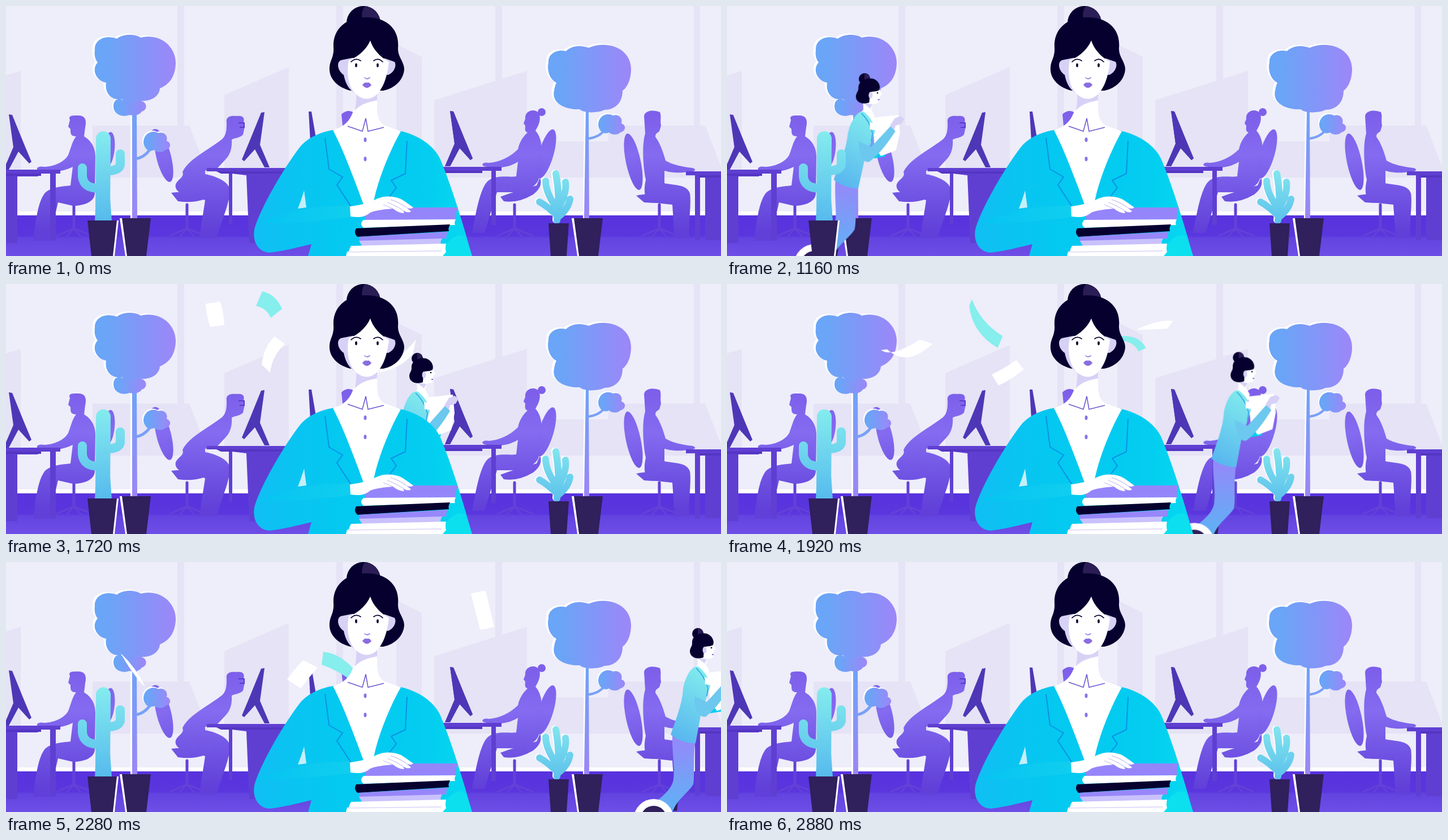
Recreate the animation shown at these times as an HTML page. Size 1264 by 443 pixels, loop 4040 ms.

```html
<!DOCTYPE html>
<html lang="en">
<head>
<meta charset="utf-8">
<title>Office</title>
<style>
html, body { margin: 0; width: 100%; height: 100%; overflow: hidden; background: #eeedfa; }
svg { display: block; width: 100vw; height: 100vh; }

/* motion advances in 40 ms steps */
.walker, .sheet { animation: 4040ms linear infinite; }
.walker { animation-name: ride; transform-origin: 0 155px; }
.sheet { fill: #fff; }
.mint { fill: #86eeec; }
#a { animation-name: a; }
#b { animation-name: b; }
#c { animation-name: c; }
#d { animation-name: d; }
#e { animation-name: e; }

@keyframes ride {
  0% { transform: translate(-1300px, 0) skewX(-2deg); animation-timing-function: step-end; }
  19.801% { transform: translate(-1105px, 1px) skewX(-2deg); animation-timing-function: steps(9); }
  28.712% { transform: translate(-804px, 0) skewX(-2deg); animation-timing-function: steps(14); }
  42.574% { transform: translate(-319px, 3px) skewX(0deg); animation-timing-function: steps(9); }
  51.485% { transform: translate(0, 0) skewX(0deg); animation-timing-function: steps(5); }
  56.435% { transform: translate(177px, -2px) skewX(0deg); animation-timing-function: steps(5); }
  61.386%, 100% { transform: translate(355px, -2px) skewX(0deg); }
}
@keyframes a {
  0%, 31.683% { d: path("M440 170Q440 170 440 170L440 170Q440 170 440 170Z"); animation-timing-function: steps(11); }
  42.574% { d: path("M361 76Q354 55 353 35L379 31Q385 52 386 73Z"); animation-timing-function: steps(9); }
  51.485% { d: path("M201 150Q242 192 331 149L351 166Q262 226 201 150Z"); animation-timing-function: steps(5); }
  56.435% { d: path("M203 162Q230 187 246 221L240 216Q218 190 203 162Z"); animation-timing-function: steps(4); }
  60.396% { d: path("M318 235Q345 250 372 240L376 256Q345 268 322 252Z"); animation-timing-function: steps(11); }
  71.287%, 100% { d: path("M410 452Q430 470 460 455L465 470Q430 485 412 466Z"); }
}
@keyframes b {
  0%, 31.683% { d: path("M450 165Q450 165 450 165L450 165Q450 165 450 165Z"); animation-timing-function: steps(11); }
  42.574% { d: path("M453 13Q477 18 488 44L468 60Q460 42 442 39Z"); animation-timing-function: steps(9); }
  51.485% { d: path("M417 38Q425 108 487 131L487 156Q412 122 417 38Z"); animation-timing-function: steps(5); }
  56.435% { d: path("M561 159Q590 162 615 190L612 212Q590 193 558 182Z"); animation-timing-function: steps(15); }
  71.287%, 100% { d: path("M600 380Q620 390 640 400L640 420Q620 410 600 400Z"); }
}
@keyframes c {
  0%, 31.683% { d: path("M455 180Q455 180 455 180L455 180Q455 180 455 180Z"); animation-timing-function: steps(11); }
  42.574% { d: path("M452 143Q456 110 475 93L493 106Q470 128 467 157Z"); animation-timing-function: steps(9); }
  51.485% { d: path("M481 174Q515 183 541 168L550 188Q520 208 490 198Z"); animation-timing-function: steps(5); }
  56.435% { d: path("M497 208Q510 190 525 174L551 187Q535 205 521 224Z"); animation-timing-function: steps(15); }
  71.287%, 100% { d: path("M560 390Q575 380 590 380L600 400Q580 405 570 415Z"); }
}
@keyframes d {
  0%, 42.574% { d: path("M680 140Q680 140 680 140L680 140Q680 140 680 140Z"); animation-timing-function: steps(9); }
  51.485% { d: path("M694 57Q764 44 789 92L766 103Q748 67 694 67Z"); animation-timing-function: steps(5); }
  56.435% { d: path("M640 120Q670 110 697 129L691 138Q670 125 640 135Z"); animation-timing-function: steps(15); }
  71.287%, 100% { d: path("M640 370Q660 370 680 390L670 410Q650 395 630 395Z"); }
}
@keyframes e {
  0%, 41.584% { d: path("M665 155Q665 155 665 155L665 155Q665 155 665 155Z"); animation-timing-function: steps(1); }
  42.574% { d: path("M655 157Q700 130 725 98L719 124Q696 152 655 157Z"); animation-timing-function: steps(9); }
  51.485% { d: path("M779 20Q815 7 840 39L826 43Q808 24 779 20Z"); animation-timing-function: steps(5); }
  56.435% { d: path("M822 56Q835 52 848 51L863 115Q850 119 838 120Z"); animation-timing-function: steps(4); }
  60.396% { d: path("M842 128Q862 122 884 126L886 152Q862 146 840 155Z"); animation-timing-function: steps(11); }
  71.287%, 100% { d: path("M870 448Q890 455 910 448L916 470Q890 480 872 470Z"); }
}
</style>
</head>
<body>
<svg viewBox="0 0 1264 443" preserveAspectRatio="none">
<defs>
  <linearGradient id="crew" gradientUnits="userSpaceOnUse" x1="0" y1="190" x2="0" y2="400">
    <stop stop-color="#7d5fea"/><stop offset=".35" stop-color="#846bf0"/><stop offset="1" stop-color="#6040d8"/>
  </linearGradient>
  <linearGradient id="leaf"><stop offset=".15" stop-color="#6aa5f7"/><stop offset="1" stop-color="#9d86f8"/></linearGradient>
  <linearGradient id="trunk" gradientUnits="userSpaceOnUse" x1="0" y1="190" x2="0" y2="375">
    <stop stop-color="#6fa3f7"/><stop offset="1" stop-color="#9b86f7"/>
  </linearGradient>
  <linearGradient id="green" gradientUnits="userSpaceOnUse" x1="0" y1="223" x2="0" y2="385">
    <stop stop-color="#84ecee"/><stop offset="1" stop-color="#55b9ed"/>
  </linearGradient>
  <linearGradient id="green2" gradientUnits="userSpaceOnUse" x1="0" y1="290" x2="0" y2="385">
    <stop stop-color="#82e6ee"/><stop offset="1" stop-color="#5cc0ec"/>
  </linearGradient>
  <linearGradient id="coat"><stop stop-color="#10bff3"/><stop offset=".35" stop-color="#04c8f0"/><stop offset=".8" stop-color="#03cdf0"/><stop offset="1" stop-color="#06daf0"/></linearGradient>
  <linearGradient id="sleeve"><stop stop-color="#06c4f2"/><stop offset="1" stop-color="#10ceee"/></linearGradient>
  <linearGradient id="suit" x1=".6" y1="0" x2=".3" y2="1"><stop stop-color="#80eaed"/><stop offset="1" stop-color="#58b6ef"/></linearGradient>
  <linearGradient id="legs" x1="0" y1="0" x2="0" y2="1"><stop stop-color="#9787fa"/><stop offset="1" stop-color="#5eb2f5"/></linearGradient>
  <linearGradient id="floor" x1="0" y1="0" x2="0" y2="1"><stop stop-color="#5833de"/><stop offset=".5" stop-color="#5a36de"/><stop offset=".56" stop-color="#6344e0"/><stop offset="1" stop-color="#6d4ee6"/></linearGradient>

  <path id="crown" d="M157 78C156 58 178 51 196 58C206 49 228 49 238 56C272 47 301 72 300 102C299 130 284 141 272 146C271 162 253 170 236 168C224 174 208 170 205 165C188 168 174 156 177 136C158 132 151 112 162 100C157 94 156 86 157 78Z"/>
  <path id="crown2" d="M959 100C958 84 975 76 990 80C1000 70 1016 69 1030 74C1062 60 1104 74 1105 111C1105 134 1096 146 1090 150C1090 172 1076 184 1058 184C1046 190 1022 190 1014 183C988 184 964 172 969 150C970 144 971 140 973 136C960 130 956 112 959 100Z"/>
  <path id="tuft" d="M243 242C243 226 258 219 269 225C278 222 287 229 284 239C293 242 292 253 282 255C276 261 266 259 262 255C252 260 244 252 243 242Z"/>
  <path id="under" d="M190 178C190 164 200 162 214 168H238C250 170 251 184 240 187C234 196 222 194 218 193C206 198 190 192 190 178Z"/>
  <path id="fronds" fill="none" stroke-linecap="round" stroke-width="12" d="M974 380Q980 340 972 297M975 360Q954 332 954 310M975 372Q956 354 943 347M977 358Q992 330 989 312M976 374Q994 360 997 342"/>
  <path id="screen" d="M5 192L11 193L30 240L45 276L41 279L22 258L5 290H-4L13 250Z"/>
  <g id="pot">
    <path fill="#fff" d="M201 376H240V443H211Z"/>
    <path fill="#30205b" d="M205 376H256L248 443H214Z"/>
  </g>
  <g id="base" fill="none" stroke="#6341d7" stroke-linecap="round">
    <path stroke-width="5" d="M0 -50V-6"/>
    <path stroke-width="3" d="M-30 5L0 -8L32 5M-14 8L0 -8L14 8"/>
  </g>
</defs>

<!-- room -->
<rect width="1264" height="443" fill="#eeedfa"/>
<g fill="#e5e3f5">
  <path d="M303 0H315V212H303ZM584 0H596V230H584ZM865 0H877V140H865ZM1216 0H1227V212H1216Z"/>
  <path d="M0 123L26 115V290H0ZM386 158L500 108V290H386ZM690 68L735 90V290H690ZM757 167L921 115V304H757Z"/>
  <path d="M153 212H324L360 304H153ZM921 240H1065V304H921ZM1065 212H1236L1264 285V304H1065Z"/>
</g>
<rect y="364" width="1264" height="7" fill="#fff"/>
<rect y="371" width="1264" height="72" fill="url(#floor)"/>

<!-- colleagues -->
<use href="#base" x="120" y="402"/><use href="#base" x="320" y="402"/>
<use href="#base" x="899" y="402"/><use href="#base" x="1155" y="402"/>
<g fill="url(#crew)">
  <path d="M113 202C109 194 118 194 126 194C140 193 143 202 140 215L138 231C150 238 158 250 158 268L157 330C158 346 140 354 118 354L92 348L76 416H48C52 385 56 345 70 330C82 320 100 320 114 318L118 285C100 294 80 296 56 291C52 287 58 283 68 285C88 284 104 275 110 264C116 248 118 238 124 231C114 231 114 226 114 218L110 214Z"/>
  <ellipse cx="182" cy="254" rx="10" ry="31" transform="rotate(6 182 254)"/>
  <path d="M390 207C388 195 398 194 408 195C420 193 422 200 420 206L422 214L419 228C412 235 404 233 399 237C400 252 396 264 388 272L374 287L352 292L352 298C374 302 394 312 396 326C396 348 382 378 372 412H342C346 380 350 360 352 344L314 334C304 330 298 324 300 316C304 306 316 304 312 294C322 272 356 256 382 236C390 228 390 218 390 207Z"/>
  <ellipse cx="279" cy="268" rx="13" ry="45" transform="rotate(-14 279 268)"/>
  <circle cx="264" cy="226" r="8"/>
  <path d="M292 331Q330 326 352 342Q330 350 304 346Z"/>
  <path d="M593 192Q604 182 615 189V222H596Z"/>
  <circle cx="947" cy="188" r="7"/>
  <path d="M918 200C916 184 938 180 943 192C946 204 940 214 936 221C946 232 948 248 946 262L942 306C938 320 920 328 902 330L868 330L846 402H824C830 370 838 322 852 310C866 298 890 304 902 302L905 276C886 288 866 288 845 284C838 280 846 276 854 278C874 276 890 268 905 254C908 240 914 232 922 224C916 222 918 216 918 212L915 208Z"/>
  <ellipse cx="955" cy="262" rx="13" ry="45" transform="rotate(16 955 262)"/>
  <path d="M874 338Q900 328 938 318L944 304Q950 320 932 334Q905 350 880 346Z"/>
  <ellipse cx="1109" cy="276" rx="13" ry="51" transform="rotate(-12 1109 276)"/>
  <path d="M1128 195C1130 184 1146 184 1156 188C1159 196 1156 202 1158 212L1155 222C1150 226 1148 226 1148 232C1156 242 1162 260 1166 274C1180 282 1196 285 1214 287C1222 290 1218 294 1206 294C1184 297 1172 294 1164 292L1164 314C1182 318 1204 316 1209 332C1212 350 1206 384 1208 412H1182L1178 352L1140 348C1126 342 1128 322 1131 308C1126 284 1124 246 1130 226Z"/>
  <path d="M1114 336Q1150 328 1196 338Q1180 352 1128 348Z"/>
</g>
<path d="M411 207H421V215H413" fill="none" stroke="#5a3bcd" stroke-width="2"/>

<!-- desks -->
<path fill="#5f3fd2" d="M0 290H96V297H88V416H78V297H60L56 302H20V420H0ZM355 287H500V420H430L425 300L400 297V386H394V297L372 293H355ZM765 285H876V292H866V388H858V292H765ZM1202 293H1264V415H1236V304L1227 300V415H1218V300H1202Z"/>
<path fill="#5435c2" d="M0 297H62V301H0ZM372 293H490V297H380ZM770 292H842V296H770ZM1226 300H1264V304H1226Z"/>
<g fill="#4e37b6">
  <use href="#screen"/><use href="#screen" x="780" y="-6"/>
  <use href="#screen" transform="matrix(-1 0 0 1 462 -4)"/>
  <use href="#screen" transform="matrix(1 0 0 1 780 -6)"/>
  <path d="M535 187H540L549 240H538Z"/>
</g>

<!-- plants -->
<path d="M220 185H229V376H220Z" fill="#fff"/>
<path d="M223 185H231L232 376H223Z" fill="url(#trunk)"/>
<path d="M229 271Q246 268 256 252" fill="none" stroke="#78a0f7" stroke-width="5"/>
<use href="#tuft" x="-2" y="-2" fill="#fff"/><use href="#tuft" fill="url(#leaf)"/>
<use href="#under" x="-2" y="-1" fill="#fff"/><use href="#under" fill="url(#leaf)"/>
<use href="#crown" x="-4" y="-2" fill="#fff"/><use href="#crown" fill="url(#leaf)"/>
<use href="#pot"/>
<path d="M1022 185H1030L1028 376H1020Z" fill="#fff"/>
<path d="M1025 185H1030L1031 376H1022Z" fill="url(#trunk)"/>
<path d="M1029 235Q1048 233 1058 220" fill="none" stroke="#78a0f7" stroke-width="4"/>
<use href="#tuft" x="802" y="-33" fill="#fff"/><use href="#tuft" x="804" y="-31" fill="url(#leaf)"/>
<use href="#crown2" x="-4" y="-2" fill="#fff"/><use href="#crown2" fill="url(#leaf)"/>
<use href="#pot" x="799"/>
<use href="#fronds" x="-2" y="-1" stroke="#fff"/><use href="#fronds" stroke="url(#green2)"/>
<path fill="#30205b" d="M959 385H995L991 443H963Z"/>

<!-- loose sheets -->
<path id="a" class="sheet"/><path id="b" class="sheet mint"/><path id="c" class="sheet"/>
<path id="d" class="sheet mint"/><path id="e" class="sheet"/>

<!-- rider -->
<g class="walker">
  <path fill="#30205b" d="M994 443L1012 418L1009 443Z"/>
  <path fill="url(#legs)" d="M1001 308L1042 318C1037 350 1041 380 1038 396C1030 410 1010 422 1002 443H972L966 430C988 416 1002 400 1003 386C1006 366 1000 340 1001 308Z"/>
  <circle cx="968" cy="457" r="29" fill="#30205b" stroke="#fff" stroke-width="12"/>
  <path fill="#00cdf0" d="M1066 258L1090 254L1087 267L1068 270Z"/>
  <path fill="#fff" d="M1063 198L1109 193L1112 226L1106 256L1080 266L1068 250Z"/>
  <path fill="#fff" d="M1045 168L1063 172L1060 184L1066 194L1062 210L1038 192L1046 184Z"/>
  <path fill="#d8d1f6" d="M1046 172L1062 174L1058 182Z"/>
  <path fill="url(#suit)" d="M1040 188C1030 194 1022 212 1020 228C1018 256 1006 284 998 308C1010 318 1028 324 1042 323L1051 274L1062 240L1068 222C1066 206 1056 194 1046 187Z"/>
  <path fill="#6cc8ee" d="M1040 240L1062 250L1096 212L1104 222C1092 242 1076 264 1060 276C1048 279 1040 262 1040 240Z"/>
  <path fill="none" stroke="#2f9fe8" stroke-width="1.6" d="M1043 190Q1058 204 1064 226L1062 240"/>
  <path fill="#fff" d="M1058 206L1067 208L1068 220L1059 219Z"/>
  <path fill="#d8d1f6" d="M1094 212L1102 199L1112 195L1119 200L1114 209L1104 212L1102 220Z"/>
  <path fill="#fff" d="M1054 138L1070 138L1074 148L1078 157L1074 160L1073 170Q1066 177 1054 170Z"/>
  <circle cx="1046" cy="129" r="10" fill="#06002f"/>
  <path fill="#2b1d55" d="M1046 119A10 10 0 0 1 1056 128L1046 132Z"/>
  <path fill="#06002f" d="M1036 146C1035 132 1050 126 1062 129C1071 132 1076 142 1073 149C1066 153 1060 150 1057 154L1056 171C1046 175 1032 172 1032 160C1032 154 1036 152 1036 146Z"/>
  <ellipse cx="1058" cy="158" rx="3.5" ry="6" fill="#d8d1f6"/>
  <circle cx="1070" cy="154" r="1.3" fill="#06002f"/>
  <path d="M1071 166H1074" stroke="#8a6cdf" stroke-width="2"/>
</g>

<!-- cactus -->
<g fill="none" stroke-linecap="round" stroke="url(#green)">
  <path stroke-width="16" d="M135 287V302Q137 323 164 323M202 262V281Q200 292 178 292"/>
  <path stroke-width="26" d="M172 235L171 368"/>
</g>
<path fill="url(#green)" d="M159 340H184L187 381H157Z"/>
<path fill="#fff" d="M193 380H199L192 443H187Z"/>
<path fill="#30205b" d="M144 380H196L189 443H151Z"/>

<!-- woman at the front -->
<path fill="url(#coat)" d="M582 219C552 224 532 234 518 252C488 292 452 355 440 392C434 414 444 436 466 437C492 434 514 428 540 422L534 443H824C812 400 790 325 768 272C756 246 728 228 695 221Z"/>
<path fill="#c4effa" d="M527 327L531 357L516 359Q522 344 527 327Z"/>
<path fill="#0ce0ef" d="M780 420Q796 402 811 408L824 443H770Z"/>
<path fill="#fff" d="M656 167C656 190 656 202 668 211L698 222C680 254 656 308 648 357H634C618 314 597 256 578 220C598 214 608 204 614 186C620 172 640 172 656 167Z"/>
<path fill="#d8d1f6" d="M619 152H656V167C640 170 626 174 616 186Q620 174 619 152Z"/>
<path fill="none" stroke="#6f5bd2" stroke-width="1.6" d="M604 213L630 222L636 199L640 222L668 215"/>
<g fill="#8a72e6"><ellipse cx="635" cy="237" rx="2.5" ry="4"/><ellipse cx="635" cy="271" rx="2.5" ry="4"/></g>
<g fill="none" stroke="#0b92e8" stroke-width="2">
  <path d="M564 234L571 289L595 303L585 317L613 360"/>
  <path d="M709 239L706 297L681 309L690 322L676 340"/>
</g>

<circle cx="632" cy="30" r="30" fill="#06002f"/>
<path fill="#2b1d55" d="M634 1C650 2 661 14 661 28L630 24C628 14 630 6 634 1Z"/>
<path fill="#06002f" d="M637 20C600 20 577 42 579 74C580 90 573 96 572 108C570 130 588 145 609 150H667C688 146 703 130 704 112C704 98 692 90 693 74C696 40 672 20 637 20Z"/>
<path fill="#d8d1f6" d="M612 92L592 96C583 100 587 116 597 122C600 136 605 147 616 154L640 120L676 122C686 118 691 106 687 99L670 93Z"/>
<path fill="#fff" d="M644 61C638 76 622 91 606 96C601 122 606 148 622 159Q638 170 653 159C668 146 674 124 677 99C664 92 649 78 644 61Z"/>
<g fill="none" stroke="#06002f" stroke-width="1.7" stroke-linecap="round">
  <path d="M610 99Q618 91 627 97M650 97Q658 91 666 99"/>
  <path stroke="#9a85e4" d="M634 127Q638 131 643 127"/>
</g>
<g fill="#06002f"><ellipse cx="619" cy="105" rx="1.9" ry="3.4"/><ellipse cx="657" cy="105" rx="1.9" ry="3.4"/></g>
<path fill="#8a6cdf" d="M630 140Q634 134 638 136Q642 134 646 140Q638 150 630 140Z"/>

<!-- books -->
<path fill="#9585fb" d="M640 357H799Q794 368 796 378L636 380Q630 366 640 357Z"/>
<path fill="#fff" d="M632 379L795 378Q792 384 794 388L632 393Q624 386 632 379Z"/>
<path fill="#06002f" d="M619 394L785 387Q781 394 783 399L621 409Q614 402 619 394Z"/>
<path fill="#9787fa" d="M624 409L781 400Q777 408 779 412L624 419Z"/>
<path fill="#c9c1fc" d="M624 416L771 412Q767 418 769 423L630 426Z"/>
<path fill="#fff" d="M610 425L778 421Q776 430 778 436L772 443H601L603 435Q608 435 607 431Z"/>
<path stroke="#d8d1f6" stroke-width="1.4" d="M603 436L770 434"/>

<path fill="url(#sleeve)" d="M446 384C480 372 520 360 560 355L607 353Q612 362 609 374C570 380 500 386 446 384Z"/>
<path fill="#fff" d="M608 355C626 353 642 349 655 342C672 334 694 337 706 347L720 357Q716 361 708 357L716 364Q710 368 702 362L704 367Q696 368 684 359C670 360 654 362 644 366C634 375 622 375 609 373Z"/>
<path fill="none" stroke="#c9c1f4" stroke-width="1.3" d="M680 343Q694 347 708 357M674 348Q688 353 702 362M667 352Q676 356 684 359"/>
</svg>
</body>
</html>
```
